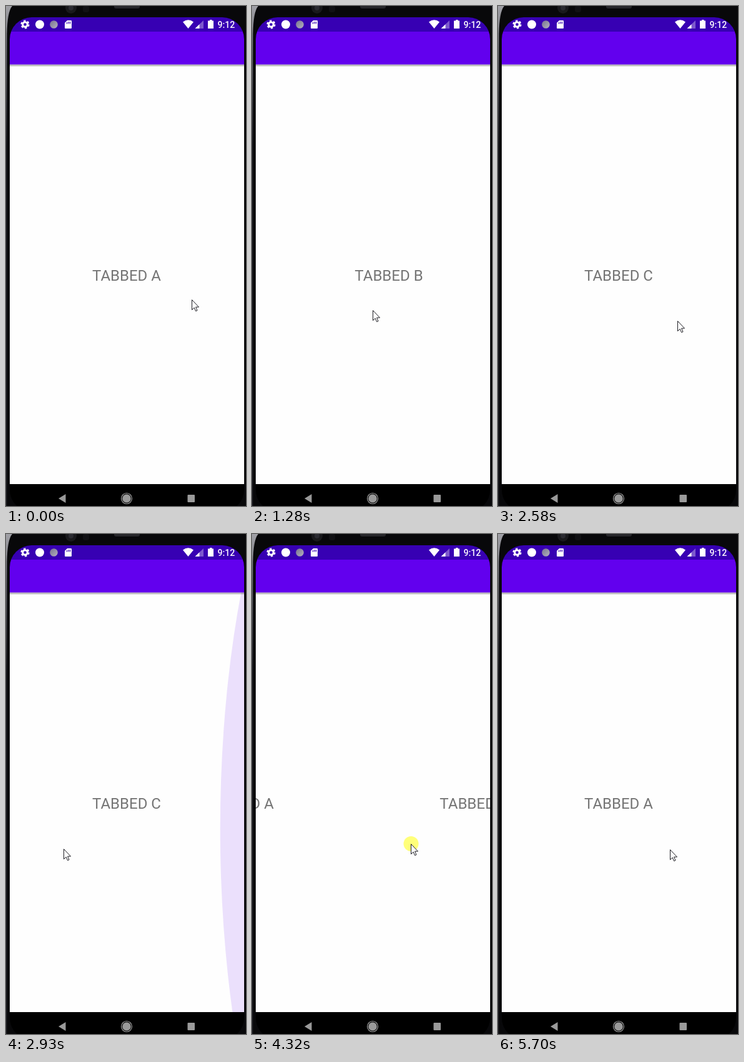
An HTML page that plays this animation: 384 px wide and 799 px high, repeating every 6.03 s.

```html
<!DOCTYPE html>
<html lang="en">
<head>
<meta charset="utf-8">
<title>Swiping between tabs</title>
<style>
  html, body { margin: 0; width: 100%; height: 100%; overflow: hidden; background: #050506; }
  svg { display: block; width: 384px; height: 799px; }
  text { font-family: Roboto, sans-serif; }
  .label { font-size: 24px; fill: #757575; text-anchor: middle; }
  .clock { font-size: 14px; font-weight: 500; fill: #fff; }
</style>
</head>
<body>
<svg viewBox="0 0 384 799">
  <defs>
    <clipPath id="screen"><rect x="6" y="18" width="375" height="790" rx="35"/></clipPath>
    <clipPath id="view"><rect x="6" y="93.5" width="375" height="670.5"/></clipPath>
    <linearGradient id="shadow" x2="0" y2="1">
      <stop stop-color="#000" stop-opacity=".4"/>
      <stop offset="1" stop-color="#000" stop-opacity="0"/>
    </linearGradient>
    <linearGradient id="edge" x2="0" y2="1">
      <stop stop-color="#a0a0a6"/>
      <stop offset=".1" stop-color="#66666c"/>
      <stop offset=".28" stop-color="#1c1c22"/>
    </linearGradient>
    <linearGradient id="ball" x2="1" y2="1">
      <stop stop-color="#77738f"/>
      <stop offset="1" stop-color="#b5b2bf"/>
    </linearGradient>
  </defs>

  <!-- phone body -->
  <rect width="384" height="799" fill="#08080a"/>
  <path d="M0 0H10Q2 9 1.5 45V799H0z" fill="url(#edge)"/>
  <circle cx="104" cy="3" r="9" fill="#19191c"/>
  <circle cx="104" cy="3" r="4" fill="#2b2b31"/>
  <rect x="123" y="0" width="10" height="10" rx="3" fill="#111114"/>
  <rect x="173" y="-6" width="41" height="10" rx="3" fill="#26262a"/>

  <g clip-path="url(#screen)">
    <rect y="18" width="384" height="781" fill="#000"/>
    <rect y="18" width="384" height="23" fill="#3700b3"/>
    <rect y="41" width="384" height="53" fill="#6200ee"/>
  </g>

  <g clip-path="url(#view)">
    <rect y="93" width="384" height="671" fill="#fefefe"/>
    <g id="pages"></g>
    <ellipse id="glow" ry="804" fill="#6200ee"/>
    <rect x="6" y="93.5" width="375" height="4" fill="url(#shadow)"/>
  </g>

  <!-- status bar -->
  <g fill="#fff">
    <g fill="none" stroke="#fff">
      <circle cx="30.5" cy="29.5" r="3.8" stroke-width="3"/>
      <circle cx="30.5" cy="29.5" r="5.9" stroke-width="2.4" stroke-dasharray="3.3 2.88"/>
    </g>
    <circle cx="54" cy="29.5" r="7"/>
    <circle cx="76.5" cy="29.5" r="6.3" fill="url(#ball)"/>
    <path d="M98 23h6q1 0 1 1v11q0 1-1 1h-9q-1 0-1-1V27z"/>
    <path d="M97.5 26v2.5M100 25v3.5M102.5 25v3.5" stroke="#3700b3" stroke-width="1.2"/>
    <path d="M283 25.5Q291.5 19 300 25.5L291.5 36z"/>
    <path d="M316 23V36H302.500z" opacity=".35"/>
    <path d="M309.500 29.300V36H302.500z"/>
    <path d="M326 22h3.500v1.500h2.500V36h-9V23.500h3z"/>
    <text class="clock" x="338.5" y="34.5">9:12</text>
  </g>

  <!-- navigation bar -->
  <g fill="#9a9a9a">
    <path d="M84 787l11.500-7v14z"/>
    <circle cx="193" cy="787" r="6.8"/>
    <circle cx="193" cy="787" r="8.5" fill="none" stroke="#9a9a9a" stroke-width="1.2"/>
    <rect x="290.5" y="781" width="11.5" height="12" rx="1"/>
  </g>

  <g id="cursor">
    <circle id="touch" cx=".5" r="12" fill="#ffff00" opacity=".52"/>
    <path d="M.5 .5V16.500L4.200 13.100 6.600 18.600 9 17.600 6.600 12.100H11.500z"
          fill="#fff" stroke="#1c1c22" stroke-linejoin="round"/>
  </g>
</svg>

<script>
const LOOP = 6030, TICK = 69, PHASE = 25;
const LEFT = 6, RIGHT = 381, WIDTH = RIGHT - LEFT, LAST_PAGE = 2;
const SLOP = 4, SETTLE = 540, RECEDE = 500;
const GLOW_DEPTH = 49, GLOW_ALPHA = 0.15;

const start = { up: -150, to: 297, y: 469 };
const end = { down: 5500, from: 275, y: 504 };
const drags = [
  { down: 800, up: 1070, from: 320, to: 193, y: 486 },
  { down: 1700, up: 1957, from: 281, to: 132, y: 488 },
  { down: 2580, up: 2865, from: 287, to: 92, y: 503 },
  { down: 3210, up: 3585, from: 92, to: 256, y: 490 },
  { down: 4050, up: 4322, from: 88, to: 256, y: 495 },
  { down: 4620, up: 4978, from: 90, to: 275, y: 495 }
];

const el = id => document.getElementById(id);
const pages = el("pages"), glow = el("glow"), cursor = el("cursor"), touch = el("touch");
const clamp = v => Math.min(1, Math.max(0, v));
const mix = (a, b, p) => a + (b - a) * p;
const smooth = p => p * p * (3 - 2 * p);

pages.innerHTML = [..."ABC"].map((letter, i) =>
  `<text class="label" x="${193 + i * WIDTH}" y="438.5">TABBED ${letter}</text>`).join("");

const dragX = (d, t) => mix(d.from, d.to, smooth(clamp((t - d.down) / (d.up - d.down))));

// Between drags the pointer rests, travels to the next starting point, and rests again.
function pointer(t) {
  const held = drags.find(d => t >= d.down && t < d.up);
  if (held) return { x: dragX(held, t), y: held.y, held };
  const a = drags.findLast(d => d.up <= t) ?? start;
  const b = drags.find(d => d.down > t) ?? end;
  const p = smooth(clamp(((t - a.up) / (b.down - a.up) - 0.3) / 0.45));
  return { x: mix(a.to, b.from, p), y: mix(a.y, b.y, p) };
}

// A drag turns the page, or stretches a glow when there is no page on that side.
function pager(t) {
  let page = 0, scroll = 0, pull = null;
  for (const d of drags.filter(d => d.down <= t)) {
    const side = Math.sign(d.from - d.to);
    const dist = Math.max(0, Math.abs(dragX(d, t) - d.from) - SLOP);
    const since = clamp((t - d.up) / (page + side < 0 || page + side > LAST_PAGE ? RECEDE : SETTLE));
    if (page + side < 0 || page + side > LAST_PAGE) {
      pull = { side, dist, fade: (1 - since) ** 2 };
    } else {
      page += side;
      scroll -= side * (t < d.up ? dist : mix(WIDTH, dist, (1 - since) ** 5));
    }
  }
  return { scroll, pull };
}

function drawGlow(pull) {
  if (!pull) return glow.setAttribute("opacity", 0);
  const { side, dist, fade } = pull;
  const depth = Math.min(GLOW_DEPTH, dist * 0.37) * fade;
  const rx = depth / (1 - Math.cos(Math.PI / 6));
  glow.setAttribute("rx", rx);
  glow.setAttribute("cx", (side > 0 ? RIGHT : LEFT) + side * (rx - depth));
  glow.setAttribute("cy", 465 + side * 6);
  glow.setAttribute("opacity", Math.min(GLOW_ALPHA, dist / 700) * fade);
}

function draw() {
  const now = performance.now() % LOOP;
  const t = Math.max(0, Math.floor((now - PHASE) / TICK) * TICK + PHASE);
  const { x, y, held } = pointer(t);
  const { scroll, pull } = pager(t);
  cursor.setAttribute("transform", `translate(${Math.round(x)} ${Math.round(y)})`);
  touch.setAttribute("visibility", held ? "visible" : "hidden");
  pages.setAttribute("transform", `translate(${Math.round(scroll)} 0)`);
  drawGlow(pull);
  requestAnimationFrame(draw);
}
draw();
</script>
</body>
</html>
```
